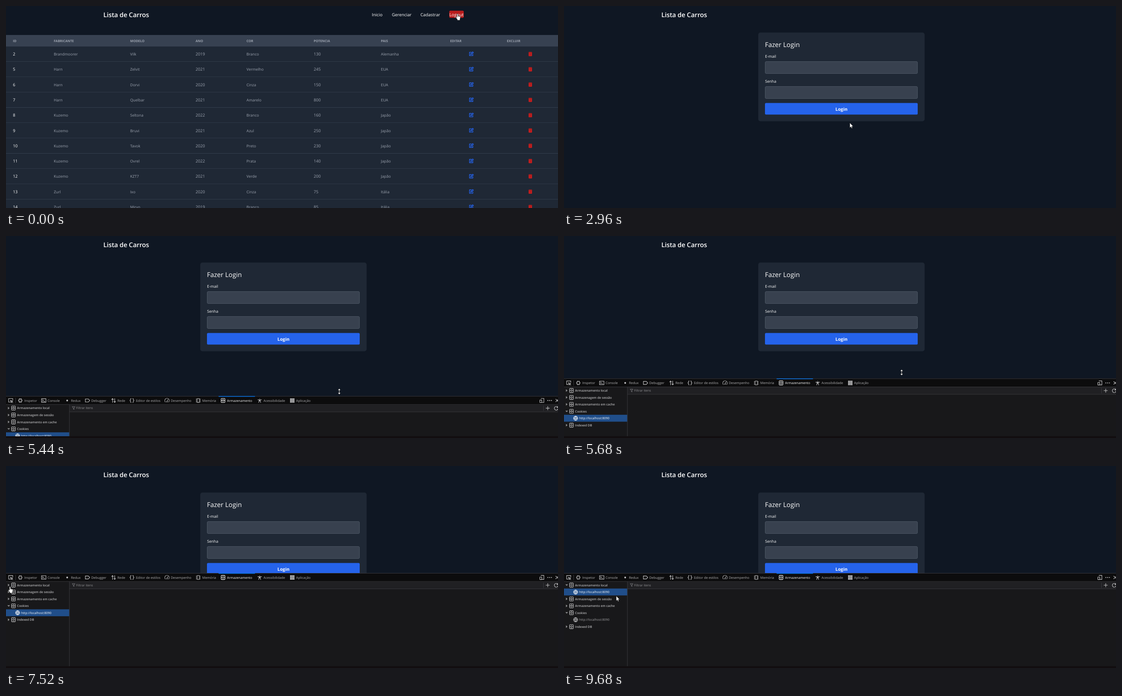
Animation of 1236 by 453 pixels, one loop 9760 ms. Source, as an HTML page:

```html
<!DOCTYPE html>
<html lang="pt-BR">
<head>
<meta charset="utf-8">
<title>Lista de Carros</title>
<style>
  html, body { margin: 0; width: 100%; height: 100%; overflow: hidden; background: #0f1723; }
  svg { display: block; width: 1236px; height: 453px; }
  text { font-family: "Open Sans", "Noto Sans", sans-serif; text-rendering: geometricPrecision; white-space: pre; }
  .ico { fill: none; stroke: #c6c6c8; stroke-width: 1.1; stroke-linecap: round; stroke-linejoin: round; }
</style>
</head>
<body>
<svg id="stage" viewBox="0 0 1236 453">
  <rect width="1236" height="453" fill="#0f1723"/>
  <g id="list"></g>
  <g id="login"></g>
  <g id="panel"><g id="tools"></g><g id="tree"></g></g>
  <rect id="edge" y="449" width="1236" height="4" fill="#120e10"/>
  <g id="cursor"></g>
</svg>
<script>
const $ = id => document.getElementById(id);
const text = (x, y, s, size, fill = '#fff', weight = 400, extra = '') =>
  `<text x="${x}" y="${y}" font-size="${size}" fill="${fill}" font-weight="${weight}" ${extra}>${s}</text>`;
const rect = (x, y, w, h, fill, r = 0, extra = '') =>
  `<rect x="${x}" y="${y}" width="${w}" height="${h}" rx="${r}" fill="${fill}" ${extra}/>`;
const icon = (x, y, d, extra = '') =>
  `<path class="ico" transform="translate(${x} ${y})" d="${d}" ${extra}/>`;
const title = text(218, 24.5, 'Lista de Carros', 14.5, '#fff', 600, 'letter-spacing="-.1"');

// Car table
const cols = [15.5, 107, 278, 424.5, 538.5, 689, 839.5, 994.5, 1121.5];
const heads = 'ID FABRICANTE MODELO ANO COR POTENCIA PAIS EDITAR EXCLUIR'.split(' ');
const cars = `2 Brandmoorer Vilk 2019 Branco 130 Alemanha
5 Harn Zelvit 2021 Vermelho 245 EUA
6 Harn Dorvi 2020 Cinza 150 EUA
7 Harn Quelbar 2021 Amarelo 800 EUA
8 Kuzemo Seltona 2022 Branco 160 Japão
9 Kuzemo Bruvi 2021 Azul 250 Japão
10 Kuzemo Tavok 2020 Preto 230 Japão
11 Kuzemo Ovrel 2022 Prata 140 Japão
12 Kuzemo KZT7 2021 Verde 200 Japão
13 Zurl Ixo 2020 Cinza 75 Itália
14 Zurl Mirvo 2019 Branco 85 Itália`.split('\n').map(row => row.split(' '));

function carRow(car, i) {
  const y = 90.8 + 34.3 * i, mid = y + 17;
  const cells = car.map((s, c) =>
    text(cols[c], mid + 3.2, s, /^\d+$/.test(s) ? 9.2 : 8.5, c ? '#9ca3af' : '#fff', c ? 400 : 500));
  return rect(0, y, 1236, 34.3, '#1f2835') + rect(0, y + 33.4, 1236, 1, '#374151') + cells.join('') +
    icon(1042, mid - .6, 'M0 -3.6H-4.2V4.2H3.4V1M-1.6 1.8L-1.2 -.2L3 -4.4L4.6 -2.8L.4 1.4Z',
      'style="stroke:#2563eb;stroke-width:1.4"') +
    rect(1170.2, mid - 4.8, 7.6, 9.4, '#c81e1e', 1.2) +
    `<path d="M1169.6 ${mid - 3.2}h8.8M1174 ${mid - 1.2}v3.6" stroke="#7f1d1d" stroke-width=".8"/>`;
}

$('list').innerHTML = title +
  text(819, 22.6, 'Inicio', 9.7) + text(864, 22.6, 'Gerenciar', 9.7) + text(928, 22.6, 'Cadastrar', 9.7) +
  rect(992.5, 10.5, 32.5, 16, '#b91c1c', 2.5) + text(992.7, 22.6, 'Logout', 9.9) +
  rect(0, 65, 1236, 26, '#374151') +
  heads.map((s, i) => text(cols[i], 80.8, s, 7.3, '#9ca3af', 700)).join('') +
  cars.map(carRow).join('');

// Login form
const field = (y, label) => text(450.3, y - 7.6, label, 8.6) +
  rect(450.5, y + .5, 341, 27, '#38414f', 2.5, 'stroke="#4b5563"');
$('login').innerHTML = title + rect(435, 59.5, 372.5, 199, '#1f2835', 5) +
  text(450, 92, 'Fazer Login', 14.7) + field(124, 'E-mail') + field(180, 'Senha') +
  rect(450, 217.5, 342, 26, '#2563eb', 2.5, 'id="submit"') +
  text(621.3, 235, 'Login', 10, '#fff', 700, 'text-anchor="middle"');

// Developer tools, drawn from the panel's top edge
const drawer = 'M-3 -4.6H3Q4.2 -4.6 4.2 -3.4V3.4Q4.2 4.6 3 4.6H-3Q-4.2 4.6 -4.2 3.4V-3.4Q-4.2 -4.6 -3 -4.6M-4.2 0H4.2M-1 -2.3H1M-1 2.3H1';
const tabs = [
  [32, 41, 'Inspetor', 'M-3 -3H3V3H-3ZM-1.5 -3V-4.6M1.5 -3V-4.6M-1.5 3V4.6M1.5 3V4.6M-3 0H-4.6M3 0H4.6'],
  [84.5, 93, 'Console', 'M-5 -4H5V4H-5ZM-2.8 -1.8L-1 0L-2.8 1.8M.4 2H2.4'],
  [137, 145.5, 'Redux', ''],
  [182.5, 191, 'Debugger', 'M-4.8 -3.4H1.8L5 0L1.8 3.4H-4.8Z'],
  [241, 249.5, 'Rede', 'M-2.4 4.4V-4.4L-4.6 -2M-2.4 -4.4L-.4 -2M2.4 -4.4V4.4L.4 2M2.4 4.4L4.6 2'],
  [282, 291, 'Editor de estilos', 'M-1.6 -4.4Q-3.2 -4.4 -3.2 -3V-1.2L-4.6 0L-3.2 1.2V3Q-3.2 4.4 -1.6 4.4M1.6 -4.4Q3.2 -4.4 3.2 -3V-1.2L4.6 0L3.2 1.2V3Q3.2 4.4 1.6 4.4'],
  [360.5, 369, 'Desempenho', 'M-3.6 3.4A4.9 4.9 0 1 1 3.6 3.4M0 2L1.8 -1.6M-1 3H1'],
  [430.5, 439.5, 'Memória', 'M-2.6 -4.2H2.6V4.2H-2.6ZM-4.8 -3H-4M-4.8 0H-4M-4.8 3H-4M4 -3H4.8M4 0H4.8M4 3H4.8'],
  [486, 495, 'Armazenamento', drawer],
  [568, 576.5, 'Acessibilidade', 'M-4.2 -1.6H4.2M0 -1.4V1M-1.2 -1.4V1L-2.2 4.6M1.2 -1.4V1L2.2 4.6M0 -4.2V-3.8'],
  [641, 649.5, 'Aplicação', [-3.4, 0, 3.4].map(y => [-3.4, 0, 3.4].map(x => `M${x - 1} ${y - 1}h2v2h-2z`).join('')).join('')]
];
const line = '#38383d';
$('tools').innerHTML = rect(0, 0, 1236, 453, '#18181a') + rect(0, 0, 1236, 19, '#0c0c0d') +
  rect(0, 0, 1236, 1, line) + rect(0, 18.5, 1236, 1, line) + rect(142, 19.5, 1094, 15.5, '#202023') +
  rect(142, 35, 1094, 1, line) + rect(141.5, 19, 1, 434, line) + rect(21, 4, 1, 12, line) +
  rect(476, 0, 81.5, 1.6, '#0a74e6') +
  icon(10.5, 10, 'M-1 3.6H-4.6V-4.4H4.6V-1M-.6 -.4L4.6 1.4L2.2 2.4L1.2 4.8ZM2.4 2.6L4.6 4.8') +
  tabs.map(([ix, x, s, d]) => {
    const on = s === 'Armazenamento';
    return (d ? icon(ix, 10, d, on ? 'style="stroke:#fff"' : '') : `<circle cx="${ix}" cy="10" r="1.9" fill="#c6c6c8"/>`) +
      text(x, 12.7, s, on ? 7.2 : 7.35, on ? '#fff' : '#b1b1b3', on ? 500 : 400);
  }).join('') +
  icon(1200, 10, 'M-2 -4.6H4.4V4.4H0M-4.6 -1H-.4V4.6H-4.6Z') +
  [1213.3, 1217.3, 1221.3].map(x => `<circle cx="${x}" cy="10" r="1.1" fill="#c6c6c8"/>`).join('') +
  icon(1234, 10, 'M-3 -3L3 3M3 -3L-3 3') +
  icon(151.5, 27, 'M-3 -3H3L.8 .2V3.2L-.8 2.2V.2Z', 'style="stroke:#8f8f92;stroke-width:.8"') +
  text(157, 29.6, 'Filtrar itens', 7.2, '#8f8f92') +
  rect(1203, 21.5, 1, 12, line) + icon(1213, 27.2, 'M-4 0H4M0 -4V4') +
  icon(1232, 27.2, 'M3.4 -2.2A4.2 4.2 0 1 0 4.2 .8M4 -4.4V-1.6H1.2');

const url = 'http://localhost:8090';
function tree(open, picked) {
  const rows = ['Armazenamento local', ...(open ? [url] : []), 'Armazenagem de sessão',
    'Armazenamento em cache', 'Cookies', url, 'Indexed DB'];
  return rows.map((s, i) => {
    const y = 27 + 15.55 * i, on = i === picked;
    if (s === url) return (on ? rect(0, y - 7.8, 141.5, 15.5, '#204e8a') : '') +
      icon(26, y, 'M-4.6 0A4.6 4.6 0 1 1 4.6 0A4.6 4.6 0 1 1 -4.6 0H4.6M0 -4.6Q-4 0 0 4.6Q4 0 0 -4.6', on ? 'style="stroke:#fff"' : '') +
      text(34, y + 2.6, s, 7, on ? '#fff' : '#a0a0a2');
    const down = rows[i + 1] === url;
    return `<path transform="translate(6 ${y})" fill="#939395" d="${down ? 'M-3 -1.4H3L0 1.8Z' : 'M-1.6 -3L1.8 0L-1.6 3Z'}"/>` +
      icon(16.7, y, drawer) + text(24.8, y + 2.6, s, 6.9, '#b8b8ba', 600);
  }).join('');
}

// Pointer shapes, each drawn around its hot spot
const shapes = {
  arrow: '<path d="M0 0V11L2.5 8.7L4.1 12.3L5.8 11.5L4.2 8.1H7.5Z" fill="#fff" stroke="#111" stroke-width=".6"/>',
  hand: '<path d="M-1.2 1Q0 -.6 1.2 1V5L5.6 6Q6.8 6.4 6.6 8L5.6 12.4V15H-.6V13L-3.6 9Q-4.2 7.4 -2.8 7.2L-1.2 8.4Z" fill="#fff" stroke="#111" stroke-width=".7"/><path d="M1.3 5V8M3.2 5.6V8M5 6V8" stroke="#222" stroke-width=".5"/>',
  beam: '<path d="M-2.5 -5.2H-.6L0 -4.7L.6 -5.2H2.5M0 -4.7V4.7M-2.5 5.2H-.6L0 4.7L.6 5.2H2.5" fill="none" stroke="#d0d4da" stroke-width="1"/>',
  resize: '<path d="M0 -6.6L3 -3H.7V3H3L0 6.6L-3 3H-.7V-3H-3Z" fill="#fff" stroke="#111" stroke-width=".5"/>'
};

// Steps: time, x, y, shape from then on
const moves = [
  [0, 1011, 17, 'hand'], [400, 1011, 18, 'arrow'], [720, 850, 95, 'arrow'], [960, 660, 180, 'beam'],
  [1200, 608, 196, 'beam'], [1360, 612, 220, 'hand'], [1680, 632, 250, 'arrow'], [1920, 640, 262, 'arrow'],
  [3600, 640, 262, 'arrow'], [4080, 649, 370, 'arrow'], [4640, 722, 424, 'resize'], [5040, 730, 420, 'resize'],
  [5680, 756, 306, 'resize'], [6080, 765, 240.5, 'resize'], [6240, 765, 239, 'resize'], [6400, 700, 255, 'arrow'],
  [7440, 9, 270, 'hand'], [7760, 9, 270, 'hand'], [7920, 20, 275, 'arrow'], [8240, 66, 281, 'arrow'],
  [8880, 70, 283, 'arrow'], [9440, 117, 291.5, 'arrow'], [9760, 117, 291.5, 'arrow']
];
const edges = [[0, 424.5], [5040, 424.5], [5680, 319.5], [6080, 241.5], [6160, 240], [9760, 240]];

function at(steps, t) {
  let i = 0;
  while (i < steps.length - 2 && t >= steps[i + 1][0]) i++;
  const a = steps[i], b = steps[i + 1], k = (t - a[0]) / (b[0] - a[0]);
  return a.map((v, n) => typeof v === 'number' ? v + (b[n] - v) * k : v);
}
const show = (id, on) => $(id).style.display = on ? '' : 'none';

let treeState, shape;
function draw(t) {
  const loggedOut = t >= 320, tools = t >= 3440;
  show('list', !loggedOut);
  show('login', loggedOut);
  show('panel', tools);
  show('edge', tools && t >= 5120);
  $('submit').setAttribute('fill', t >= 1360 && t < 1680 ? '#1d4ed8' : '#2563eb');
  $('panel').setAttribute('transform', `translate(0 ${at(edges, t)[1]})`);

  const state = t < 7680 ? 0 : t < 8320 ? 1 : 2;
  if (state !== treeState) {
    treeState = state;
    $('tree').innerHTML = tree(state > 0, [4, 5, 1][state]);
  }
  const [, x, y, kind] = at(moves, t);
  if (kind !== shape) $('cursor').innerHTML = shapes[shape = kind];
  $('cursor').setAttribute('transform', `translate(${x} ${y})`);
}

const start = performance.now();
function tick(now) {
  const t = Math.max(0, now - start) % 9760;
  draw(Math.floor(t / 80) * 80);
  requestAnimationFrame(tick);
}
draw(0);
requestAnimationFrame(tick);
</script>
</body>
</html>
```
